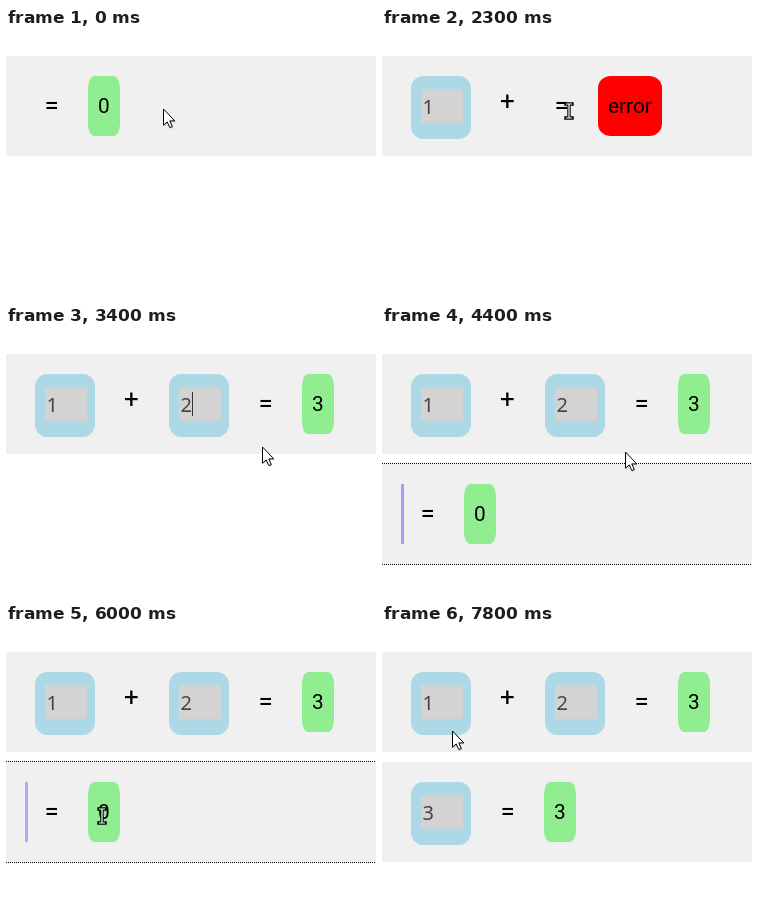
These frames come from a looping animation (370 by 270 pixels, 8000 ms). An HTML page:

```html
<!DOCTYPE html>
<html lang="en">
<head>
<meta charset="utf-8">
<title>Cell calculator</title>
<style>
  html, body { margin: 0; width: 100%; height: 100%; overflow: hidden; background: #fff; }
  svg { display: block; width: 370px; height: 270px; }
  text { font: 20.8px Roboto, sans-serif; }
  .op { font-size: 26px; }
  .field { font: 20px "Noto Sans", sans-serif; fill: #444; }
  .edge { stroke: #000; stroke-dasharray: 1 1; }
</style>
</head>
<body>
<svg viewBox="0 0 370 270">
  <g id="rows"></g>
  <rect id="caret" width="3" height="60" fill="#00f"/>
  <g id="mouse">
    <g id="arrow">
      <path d="M1.5 2.5V18.5L5 15.4L7.7 21L10.4 19.8L7.9 14.2H13Z" fill="#000" opacity=".15"/>
      <path d="M.5 1V17.2L4.2 13.9L6.8 19.6L9.3 18.5L6.8 12.9H11.8Z" fill="#fff" stroke="#000"/>
    </g>
    <g id="beam" fill="none">
      <path d="M-3 -7H3M-3 7H3M0 -7V7" stroke="#000" stroke-width="3.4" stroke-linecap="square"/>
      <path d="M-3 -7H3M-3 7H3M0 -7V7" stroke="#fff" stroke-width="1.2"/>
    </g>
  </g>
</svg>
<script>
const LOOP = 8000, STEP = 100;
const $ = id => document.getElementById(id);

// start time, rows (cells + result), focused row, row and cell being typed in
const scenes = [
  [0, [['', '0']]],
  [600, [['', '0']], 0],
  [1500, [['1', '1']], -1, [0, 0]],
  [1900, [['1+', 'error']], -1, [0, 0]],
  [2100, [['1+', 'error']]],
  [2400, [['1+', 'error']], 0],
  [2900, [['1+2', '3']], -1, [0, 2]],
  [3600, [['1+2', '3']], 0],
  [4000, [['1+2', '3'], ['', '0']], 1],
  [6600, [['1+2', '3'], ['3', '3']], -1, [1, 0]],
  [7200, [['1+2', '3'], ['3', '3']]]
];

// time, x, y
const path = [
  [0, 157, 80], [2000, 157, 80], [2300, 187, 83], [2500, 187, 83],
  [2900, 168, 112], [3000, 168, 112], [3200, 228, 126], [3300, 228, 126],
  [3400, 256, 120], [3600, 256, 120], [4400, 243, 125], [5300, 96, 192],
  [6200, 96, 192], [6900, 153, 218], [7300, 153, 218], [7800, 70, 106], [LOOP, 70, 106]
];

const rect = (x, y, w, h, fill, round = '') =>
  `<rect x="${x}" y="${y}" width="${w}" height="${h}" fill="${fill}" ${round}/>`;
const label = (x, y, s, cls = '') => `<text x="${x}" y="${y}" class="${cls}">${s}</text>`;

// x position just after the given cells
const endOf = cells => [...cells].reduce((x, c) => x + (c === '+' ? 54 : 80), 19);
const rowTop = i => 28 + 110 * i;

function drawRow([cells, result], i, focus, typing) {
  const y = rowTop(i), end = endOf(cells);
  let out = rect(0, y, 370, 100, '#f0f0f0');
  if (focus === i)
    out += `<path class="edge" d="M0 ${y - .5}H370M0 ${y + 100.5}H370"/>`;
  [...cells].forEach((c, k) => {
    const x = endOf(cells.slice(0, k));
    if (c === '+') {
      out += label(x + 19, y + 53.5, c, 'op');
      return;
    }
    out += rect(x + 10, y + 20, 60, 63, '#add8e6', 'rx="12" ry="12.6"')
      + rect(x + 20, y + 33, 42, 34, '#d3d3d3')
      + label(x + 21.5, y + 58, c, 'field');
    if (typing && typing[0] === i && typing[1] === k)
      out += rect(x + 33, y + 38, 1, 24, '#333');
  });
  const bad = result === 'error', w = bad ? 64 : 32;
  return out + label(end + 19.5, y + 57.5, '=', 'op')
    + rect(end + 63, y + 20, w, 60, bad ? '#f00' : '#90ee90', `rx="${w / 5}" ry="12"`)
    + label(end + 73, y + 57, result);
}

function mouseAt(t) {
  const k = path.findIndex(p => p[0] > t);
  const [t0, x0, y0] = path[k - 1], [t1, x1, y1] = path[k];
  const u = (t - t0) / (t1 - t0), e = u * u * (3 - 2 * u);
  return [x0 + (x1 - x0) * e, y0 + (y1 - y0) * e].map(Math.round);
}

// the pulse stalls shortly before a key press
function pulse(t) {
  if (t < 1500) t = Math.min(t, 900);
  else if (t >= 6000 && t < 6300) t = 6000;
  return .45 + .45 * Math.cos((t - 690) / 1000 * 2 * Math.PI);
}

let shown;
function render(t) {
  const scene = scenes.filter(s => s[0] <= t).pop();
  const [, rows, focus = -1, typing] = scene;
  if (scene !== shown) {
    $('rows').innerHTML = rows.map((r, i) => drawRow(r, i, focus, typing)).join('');
    shown = scene;
  }
  const caret = $('caret');
  caret.setAttribute('opacity', focus < 0 ? 0 : pulse(t));
  if (focus >= 0) {
    caret.setAttribute('x', endOf(rows[focus][0]));
    caret.setAttribute('y', rowTop(focus) + 20);
  }
  const beam = (t >= 2300 && t < 2600) || (t >= 5200 && t < 6400);
  $('mouse').setAttribute('transform', `translate(${mouseAt(t)})`);
  $('arrow').setAttribute('visibility', beam ? 'hidden' : 'visible');
  $('beam').setAttribute('visibility', beam ? 'visible' : 'hidden');
}

let start;
function tick(now) {
  start ??= now;
  const t = (now - start) % LOOP;
  render(t - t % STEP);
  requestAnimationFrame(tick);
}
render(0);
requestAnimationFrame(tick);
</script>
</body>
</html>
```
